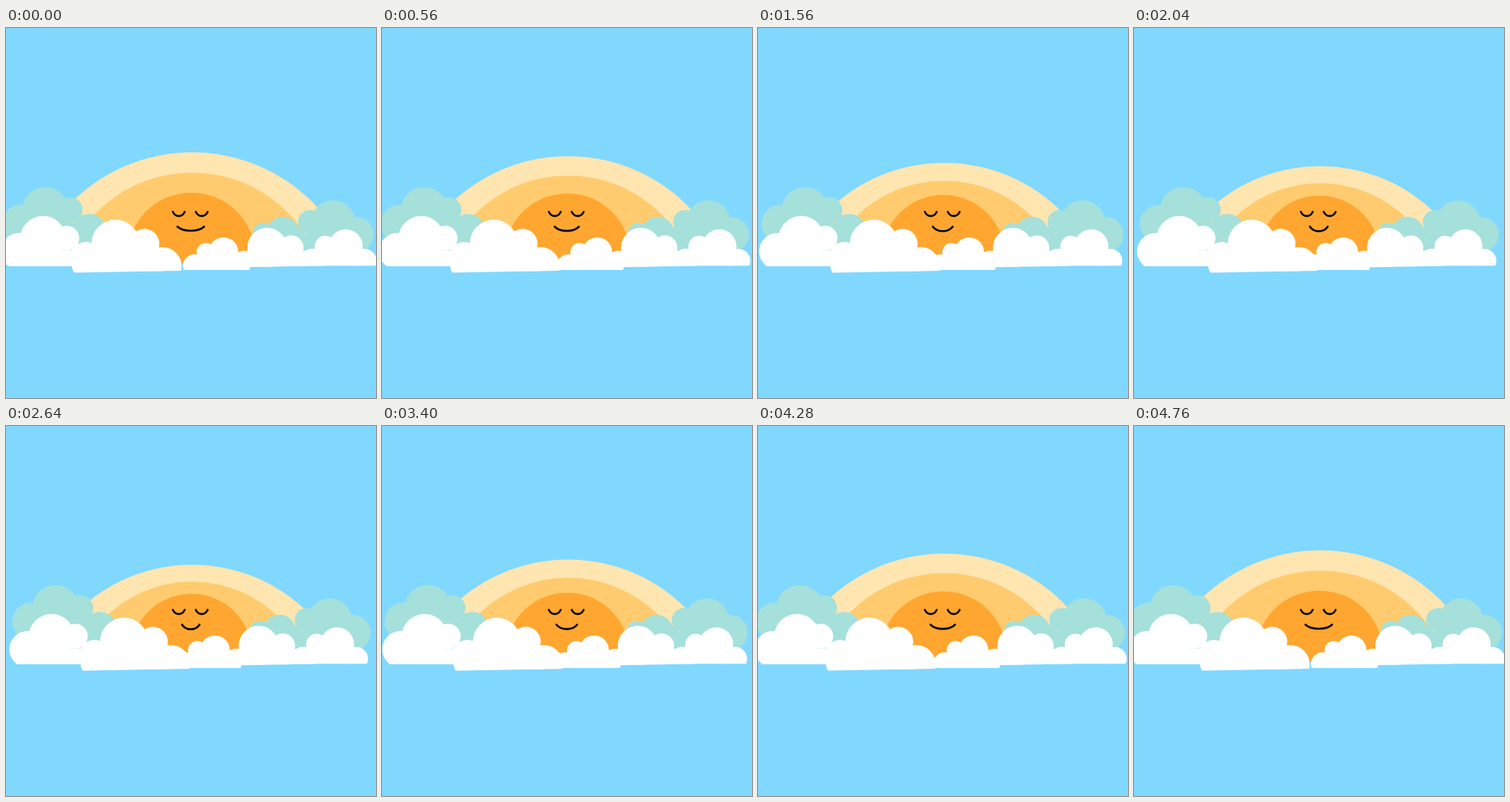
An HTML page with a canvas for the animation above (4.84 s loop, 500 px wide and 500 px high).

```html
<!DOCTYPE html>
<html lang="en">
<head>
<meta charset="utf-8">
<title>Resting sun</title>
<style>
  html, body { margin: 0; width: 100%; height: 100%; overflow: hidden; background: #80d8ff; }
  canvas { display: block; }
</style>
</head>
<body>
<canvas id="stage" width="500" height="500"></canvas>
<script>
const ctx = document.getElementById('stage').getContext('2d');
const LOOP = 4840, HALF = 2380;

// Puffs around a main one of radius 1: x, y, radius; the last marks the far end
const TALL = [[-1.04, 0.54, 0.8], [1.04, -0.03, 0.54], [1.87, 0.82, 0.69]];
const LONG = [[-1.12, 0.85, 0.7], [1.2, 0, 0.62], [1.95, 0.94, 0.8]];

function disc(x, y, r) {
  ctx.beginPath();
  ctx.arc(x, y, r, 0, 2 * Math.PI);
  ctx.fill();
}

// Draws with everything below a (slightly tilted) base line cut off
function above(base, tilt, paint) {
  ctx.save();
  ctx.beginPath();
  ctx.moveTo(-50, 0);
  ctx.lineTo(550, 0);
  ctx.lineTo(550, base - 300 * tilt);
  ctx.lineTo(-50, base + 300 * tilt);
  ctx.clip();
  paint();
  ctx.restore();
}

function cloud(puffs, x, y, r, base, { flip = 1, tilt = 0 } = {}) {
  above(base, tilt, () => {
    ctx.translate(x, y);
    ctx.scale(r * flip, r);
    disc(0, 0, 1);
    for (const puff of puffs) disc(...puff);
    ctx.fillRect(-0.7, 0.5, 0.7 + puffs.at(-1)[0], 2);
  });
}

function drift(dx, color, paint) {
  ctx.save();
  ctx.translate(dx, 0);
  ctx.fillStyle = color;
  paint();
  ctx.restore();
}

function smile(x, y, halfWidth, depth) {
  const cx = halfWidth * 0.55, cy = y + depth / 0.75;
  ctx.beginPath();
  ctx.moveTo(x - halfWidth, y);
  ctx.bezierCurveTo(x - cx, cy, x + cx, cy, x + halfWidth, y);
  ctx.stroke();
}

function ray(x, top, r, color) {
  ctx.fillStyle = color;
  above(319, 0, () => disc(x, top + r, r));
}

function draw(now) {
  const p = Math.max(0, 1 - Math.abs(now % LOOP / HALF - 1));
  const mirrored = { flip: -1 }, tilted = { tilt: 0.018 };

  ctx.fillStyle = '#80d8ff';
  ctx.fillRect(0, 0, 500, 500);

  ray(251.5, 168 + 21.8 * p, 230 - 9 * p, '#ffe5b0');
  ray(251.5, 195.5 + 16.7 * p, 182 - 16.7 * p, '#ffcb6e');

  drift(16 * p, '#a5e0db', () => cloud(TALL, 53, 247, 32, 302));
  drift(-5 * p, '#a5e0db', () => {
    cloud(TALL, 442, 263, 30, 304, mirrored);
    cloud(LONG, 374, 277, 22, 304, mirrored);
  });

  ray(250.5, 222.5 + 4.7 * p, 86.5 - 4.7 * p, '#ffa630');
  ctx.lineWidth = 2.7;
  ctx.lineCap = 'round';
  for (const x of [233.5, 264.5]) smile(x, 248.5, 8, 5.6);
  smile(249.7, 268.5, 18 - 7 * p, 5.5 + 0.8 * p);

  drift(13 * p, '#fff', () => {
    cloud(TALL, 50, 285, 31, 322);
    cloud(LONG, 148, 291.5, 32.5, 327.8, tilted);
  });
  drift(-13 * p, '#fff', () => {
    cloud(LONG, 294, 303, 20, 327, mirrored);
    cloud(LONG, 353, 297, 27, 324.6, tilted);
    cloud(LONG, 459, 295, 23, 321.3, mirrored);
  });
}

const start = performance.now();
function tick() {
  draw(performance.now() - start);
  requestAnimationFrame(tick);
}
tick();
</script>
</body>
</html>
```
